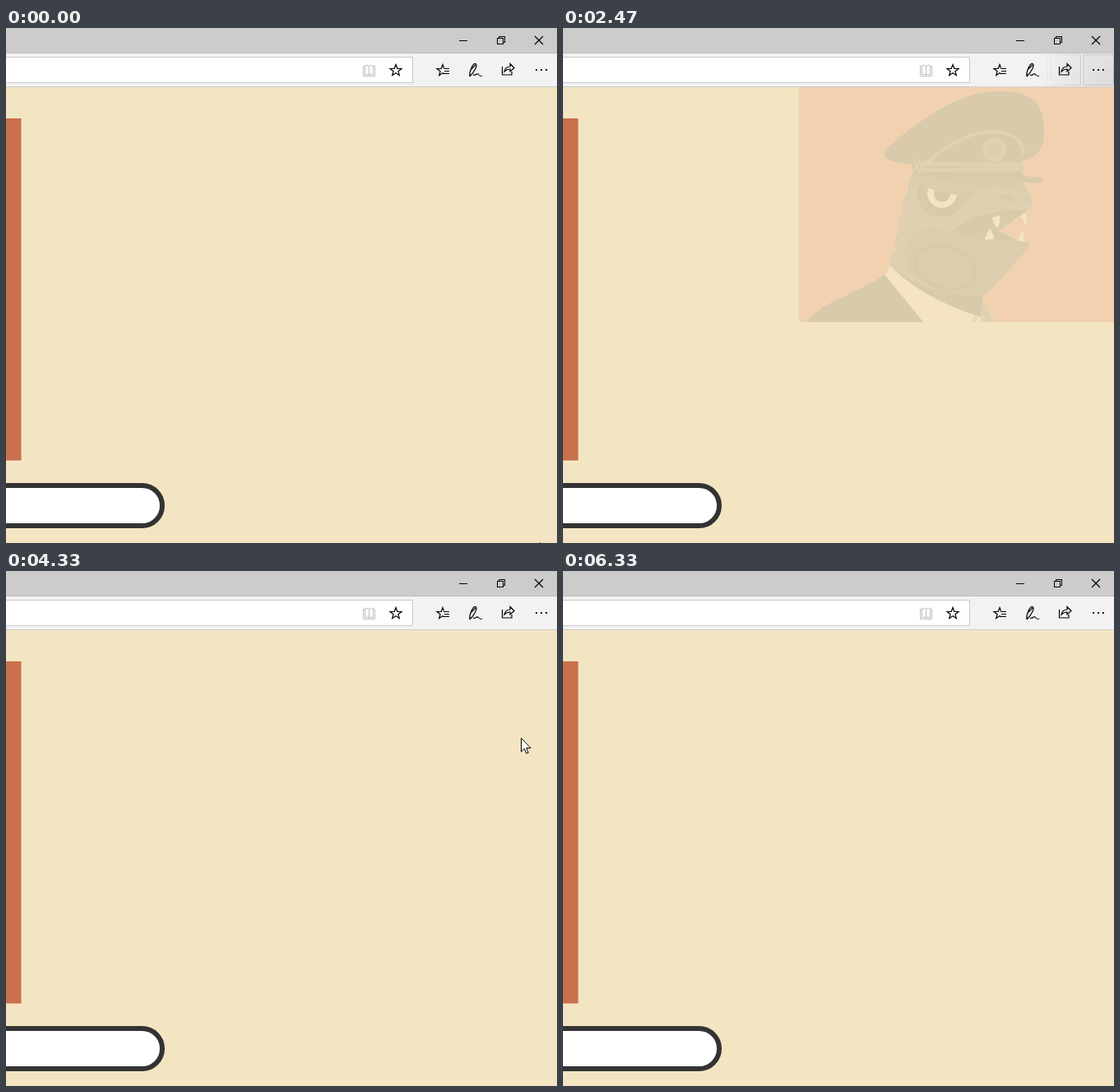
Write an HTML page that moves like this. It is 670 px wide and 627 px high and loops after 7.34 s.

```html
<!DOCTYPE html>
<html lang="en">
<head>
<meta charset="utf-8">
<title>Exit intent</title>
<style>
html, body { margin: 0; width: 100%; height: 100%; overflow: hidden; background: #f4e5c2; }
svg { display: block; width: 100vw; height: 100vh; }
.line { fill: none; stroke: #000; stroke-width: 1.2; }
.thin { fill: none; stroke: #000; stroke-width: 1; shape-rendering: crispEdges; }
</style>
</head>
<body>
<svg viewBox="0 0 670 627">
  <defs>
    <radialGradient id="glow" gradientUnits="userSpaceOnUse" r="92">
      <stop offset="0" stop-opacity=".09"/><stop offset=".45" stop-opacity=".055"/><stop offset="1" stop-opacity="0"/>
    </radialGradient>
    <radialGradient id="edge" gradientUnits="userSpaceOnUse" r="92">
      <stop offset="0" stop-opacity=".22"/><stop offset=".45" stop-opacity=".15"/><stop offset="1" stop-opacity="0"/>
    </radialGradient>
    <clipPath id="frame"><path d="M287 72H670V358H287Z"/></clipPath>
    <path id="star" d="M0-7 1.8-2.2 7-2 2.9 1.2 4.3 6.2 0 3.3-4.3 6.2-2.9 1.2-7-2-1.8-2.2Z"/>
  </defs>

  <!-- page -->
  <path fill="#f4e5c2" d="M0 72H670V627H0Z"/>
  <path fill="#ca704c" d="M0 110H18.5V526.5H0Z"/>
  <rect x="-100" y="557" width="290" height="49" rx="24.5" fill="#fff" stroke="#333" stroke-width="6"/>

  <!-- popup -->
  <g id="popup" clip-path="url(#frame)">
    <path fill="#e56449" d="M287 72H670V358H287Z"/>
    <path fill="#3b322b" d="M295 358 315 340 380 308 392 299 440 358Z"/>
    <path fill="#8f8470" d="M509 330 529 358H508Z"/>
    <path fill="#655c4d" d="M510 337 523 358H516L509 345Z"/>
    <path fill="#f6e0bf" d="M399 289C425 316 465 338 509 351L507 358H438L391 300Z"/>
    <path fill="#b9a98c" d="M500 349 505 350 502 358H497Z"/>
    <path fill="#3e382c" d="M399 290 404 270 511 324 508 352C465 338 425 318 399 290Z"/>
    <path fill="#655c4d" d="M424 178 419 192 420 198Q414 207 411 216L414 223Q408 231 406 241L410 247Q403 254 402 262L406 268Q399 276 396 284L402 292C425 313 460 325 511 326L566 266 530 247 563 223 570 216 571 208 562 192 552 178Z"/>
    <path fill="#3e382c" d="M431 196C428 214 440 231 462 230C482 229 487 210 505 197L440 188Z"/>
    <circle cx="461" cy="201" r="18" fill="#f6e0bf"/>
    <circle cx="461" cy="202" r="10" fill="#3b322b"/>
    <path fill="#514a3e" d="M424 178 419 198 428 193C438 191 454 200 478 203 492 202 500 196 512 195 530 191 545 196 566 203L558 188 552 178Z"/>
    <path fill="#443c32" d="M425 178C450 180 470 190 505 191 525 191 545 190 557 188L552 176Z"/>
    <ellipse cx="540" cy="207" rx="9.5" ry="4.5" transform="rotate(8 540 207)" fill="#443c32"/>
    <ellipse cx="564.5" cy="208" rx="4" ry="3" fill="#443c32"/>
    <path fill="#3e382c" d="M470 248C489 236 508 220 564 222L530 247 552 258 512 262Z"/>
    <path fill="#514a3e" d="M416 276C416 256 430 243 449 243 470 246 492 256 520 258 540 259 552 258 565 261Q568 264 566 268L525 314 511 326C470 329 416 312 416 276Z"/>
    <ellipse cx="465" cy="292" rx="37" ry="25" transform="rotate(18 465 292)" fill="none" stroke="#3e362b" stroke-width="4"/>
    <path fill="#f6e0bf" d="M521 231 531 228Q533 235 529 243L526 242ZM513 258Q515 249 519 244 523 249 524 257ZM556 229 563 226Q565 233 563 240ZM554 259Q555 250 559 247 561 254 561 260Z"/>
    <path fill="#3b322b" d="M390 152C398 141 425 119 458 99 485 83 510 77 533 77 560 77 577 86 582 103 586 118 585 130 584 138 581 152 570 159 558 161L563 169 557 178C567 182 576 182 584 183Q586 186 580 188C570 190 558 187 548 184 510 183 465 181 426 179L424 166C406 163 391 163 390 152Z"/>
    <g fill="none" stroke="#766b58" stroke-width="4" stroke-linecap="round">
      <path d="M443 164C462 146 492 127 520 126 545 127 559 135 560 152"/>
      <path stroke-width="5" d="M442 165.5 556 166.5M442 172.5 556 172"/>
      <path d="M427 163 431 169 427 174M433 161 437 168 433 175M440 163 436 168 440 173M559 165 561 169 559 174"/>
    </g>
    <circle cx="524.5" cy="148.5" r="12" fill="#574f43" stroke="#766b58" stroke-width="4"/>
    <circle cx="524.5" cy="148.5" r="14" fill="none" stroke="#766b58" stroke-width="1.5" stroke-dasharray="2 1.5"/>
  </g>

  <!-- browser chrome -->
  <path fill="#ccc" d="M0 0H670V31H0Z"/>
  <path fill="#f2f2f2" d="M0 31H670V72H0Z"/>
  <path fill="#bdbdbd" d="M0 30H670V31H0Z"/>
  <path fill="#cdcdcd" d="M0 71H670V72H0Z"/>
  <path fill="#fff" stroke="#c8c8c8" d="M-2 35.5H494.5V66.5H-2Z"/>
  <g fill="url(#glow)" stroke="url(#edge)">
    <path d="M512.5 32.5H549.5V69.5H512.5ZM552.5 32.5H589.5V69.5H552.5ZM592.5 32.5H629.5V69.5H592.5ZM632.5 32.5H669.5V69.5H632.5Z"/>
  </g>
  <path class="thin" d="M551 15.5H561M597.5 12.5H604.5V19.5H597.5ZM599.5 12.5V10.5H606.5V17.5H604.5"/>
  <path class="line" d="M643 10 653 20M653 10 643 20"/>
  <path fill="none" stroke="#bcbcbc" d="M441.5 57.5V46.5Q438 44 436.5 46V56.5H446.5V46Q445 44 441.5 46.5M436.5 46.5H434.5V58.5H448.5V46.5H446.5"/>
  <use href="#star" class="line" x="474" y="51.5"/>
  <use href="#star" class="line" x="531" y="51.5"/>
  <path fill="#f2f2f2" d="M532.5 48H540V59H532.5Z"/>
  <path class="thin" d="M532 49.5H539M533 52.5H539M532 55.5H539"/>
  <path class="line" d="M564 59C563 52 568 43 571 43.5 574 45 570 53 564 59M566 50 571 45M568 57C571 59 571 55 574 56 576 59 577 59 579 58"/>
  <path class="line" d="M603.5 47V57H615V53M606 53C607 48 610 47 613 47V43.5L618 48.5 613 53V50C610 50 608 51 606 53Z"/>
  <path d="M644 50H646V52H644ZM650 50H652V52H650ZM656 50H658V52H656Z"/>

  <path id="cursor" fill="#fff" stroke="#000" d="M0 0V16.5L3.8 12.8 6.4 18.7 8.7 17.7 6.2 12H11.5Z"/>
</svg>
<script>
const LOOP = 7340, FPS = 15;
const $ = id => document.getElementById(id);
const popup = $('popup'), cursor = $('cursor'), lights = [$('glow'), $('edge')];

// Cursor visits: [tick, x, y]; hidden between visits
const visits = [
  [[0, 649, 626]],
  [[12, 4, 610], [16, 140, 470], [20, 310, 322], [23, 421, 239], [27, 530, 164], [31, 621, 94], [34, 667, 62]],
  [[49, 612, 115], [51, 575, 205], [54, 497, 371], [56, 465, 430], [61, 465, 430], [63, 530, 338],
   [65, 626, 203], [67, 652, 115], [68, 662, 72]],
  [[80, 660, 72], [82, 660, 72], [85, 648, 190], [88, 646, 380], [91, 650, 580]]
];

const ease = p => (1 - Math.cos(Math.PI * Math.min(1, Math.max(0, p)))) / 2;
const pulse = (k, show, hide) => ease((k - show) / 8) - ease((k - hide) / 8);

function along(keys, k) {
  let i = 0;
  while (i < keys.length - 1 && keys[i + 1][0] <= k) i++;
  const [k0, x0, y0] = keys[i], [k1, x1, y1] = keys[i + 1] || keys[i];
  const p = k1 > k0 ? (k - k0) / (k1 - k0) : 0;
  return [Math.round(x0 + (x1 - x0) * p), Math.round(y0 + (y1 - y0) * p)];
}

function draw(ms) {
  const k = Math.floor((ms % LOOP + 4) * FPS / 1000);
  const keys = visits.filter(v => v[0][0] <= k).pop();
  const [x, y] = along(keys, k);
  cursor.setAttribute('transform', `translate(${x + .5} ${y + .5})`);
  cursor.style.display = k <= keys[keys.length - 1][0] ? '' : 'none';
  // The toolbar glow stays where the cursor was last seen
  for (const g of lights) {
    g.setAttribute('cx', x);
    g.setAttribute('cy', y);
  }
  popup.style.opacity = pulse(k, 35, 49) + pulse(k, 71, 82);
}

const start = performance.now();
(function tick() {
  draw(performance.now() - start);
  requestAnimationFrame(tick);
})();
</script>
</body>
</html>
```
